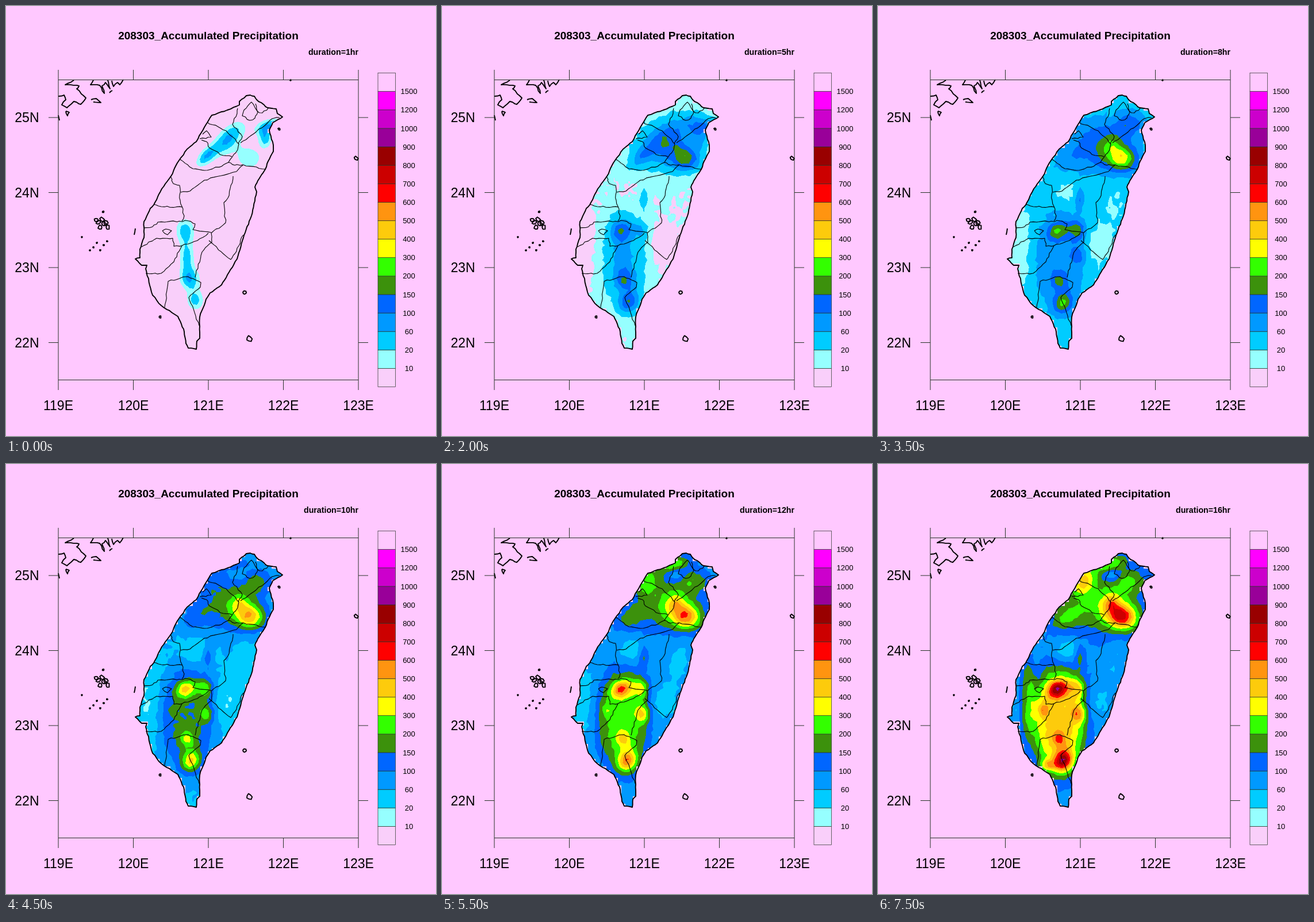
Recreate the animation shown at these times as an HTML page with a canvas. Size 748x748 px, loop 8000 ms.

```html
<!DOCTYPE html>
<html lang="en">
<head>
<meta charset="utf-8">
<title>Accumulated Precipitation</title>
<style>
  html, body { margin: 0; width: 100%; height: 100%; overflow: hidden; background: #ffc8ff; }
  canvas, svg { position: absolute; left: 0; top: 0; width: 748px; height: 748px; display: block; }
  text { font-family: "Liberation Sans", Arial, sans-serif; fill: #000; }
  .bold { font-weight: bold; }
  .axis { font-size: 23px; }
  .key { font-size: 13px; text-anchor: middle; }
  .frame { fill: none; stroke: #263426; stroke-width: 1; }
  .coast { fill: none; stroke: #000; stroke-width: 1.9; stroke-linejoin: round; }
  .border { fill: none; stroke: #000; stroke-width: 1.1; stroke-linejoin: round; }
</style>
</head>
<body>
<canvas id="rain" width="748" height="748"></canvas>
<svg id="map" viewBox="0 0 748 748">
  <text class="bold" x="352" y="58" font-size="19" text-anchor="middle">208303_Accumulated Precipitation</text>
  <text class="bold" id="duration" x="613" y="85" font-size="14.2" text-anchor="end">duration=1hr</text>
</svg>
<script>
const svg = document.getElementById('map');
const label = document.getElementById('duration');
const ctx = document.getElementById('rain').getContext('2d');

const COLORS = ['#f9cffa', '#96ffff', '#00ccff', '#0099ff', '#0066ff', '#3c910c', '#33ff00', '#ffff00',
  '#fdcb0c', '#ff9410', '#ff0000', '#cc0000', '#990000', '#990099', '#cc00cc', '#ff00ff', '#ffc8ff'];
const LIMITS = [10, 20, 60, 100, 150, 200, 300, 400, 500, 600, 700, 800, 900, 1000, 1200, 1500];

let seed = 7;
function random() {
  seed = (seed * 1664525 + 1013904223) % 4294967296;
  return seed / 4294967296;
}
const jitter = size => (random() * 2 - 1) * size;

function add(tag, attrs, text) {
  const el = document.createElementNS('http://www.w3.org/2000/svg', tag);
  for (const name in attrs) el.setAttribute(name, attrs[name]);
  if (text !== undefined) el.textContent = text;
  svg.appendChild(el);
}
const stroke = (kind, d) => add('path', { class: kind, d });

// Joins key points with a naturally ragged line
function ragged(keys, size) {
  const points = keys.split(' ').map(p => p.split(',').map(Number));
  let d = 'M' + points[0];
  for (let i = 1; i < points.length; i++) {
    const [ax, ay] = points[i - 1], [bx, by] = points[i];
    const parts = Math.ceil(Math.hypot(bx - ax, by - ay) / 6);
    for (let k = 1; k < parts; k++) {
      d += `L${ax + (bx - ax) * k / parts + jitter(size)} ${ay + (by - ay) * k / parts + jitter(size)}`;
    }
    d += 'L' + points[i];
  }
  return d;
}

const coast = ragged('425,155 432,157 436,163 449,172 455,177 470,179 472,187 481,193 464,203 458,216 '
  + '465,242 465,253 456,270 451,284 438,304 433,315 436,323 427,365 414,399 402,440 388,463 375,485 '
  + '355,499 348,510 337,541 337,578 332,583 331,597 317,595 313,587 309,562 299,540 270,521 255,503 '
  + '243,457 245,451 236,451 225,440 233,438 233,423 240,403 240,375 251,352 257,346 271,318 287,296 '
  + '298,273 315,249 331,236 345,211 358,190 385,181 406,172 406,166 418,156 425,155', .6) + 'Z';
const island = new Path2D(coast);

const BORDERS = [
  '403,178 402,187 394,206 411,227 404,239',
  '427,167 414,181 411,191 424,199 433,195 438,184 427,167',
  '434,170 437,183 446,186 456,178',
  '476,194 463,196 450,208 408,238',
  '350,202 383,217 405,240 403,250 387,272 398,277',
  '342,223 349,217 357,228 337,231',
  '340,233 349,236 354,247 378,260 393,262',
  '303,267 325,283 345,286 375,279 387,272',
  '398,277 412,276 452,284',
  '304,324 320,322 345,303 401,288 412,277',
  '286,296 291,309 302,312 303,338 310,365 306,374',
  '257,345 270,349 307,350',
  '239,386 255,384 264,376 318,374 329,379 325,389 357,394',
  '395,296 386,334 379,342 382,377 357,395',
  '272,391 278,388 288,391 281,398 272,391',
  '236,419 262,404 290,404 292,418 306,417',
  '243,465 270,465 292,445 306,417 333,408 352,395',
  '357,395 358,411 341,428 329,472',
  '353,408 378,431 391,441 398,431 413,398',
  '276,524 282,479 312,471 325,474 339,481 338,489 318,507 336,556'
];
const MAINLAND = [
  '91,157 101,155 104,163 97,172 106,177 118,166 130,171 139,160 123,144 127,139 103,137 118,129',
  '152,129 147,137 163,138 171,152 167,139 173,133 181,144 177,129',
  '184,130 187,140 194,133 198,137 204,128',
  '148,163 157,161 165,168 152,167', '104,183 110,185 107,191 104,183', '180,151 185,147', '91,190 93,199',
  '225,387 223,398'
];

function islet(x, y, r) {
  let d = '';
  for (let i = 0; i < 7; i++) {
    const a = i / 7 * Math.PI * 2, q = r * (.6 + random() * .5);
    d += (i ? 'L' : 'M') + (x + q * Math.cos(a)) + ' ' + (y + q * Math.sin(a));
  }
  stroke('coast', d + 'Z');
}

// Rain systems: flattened ellipses added to a steady rise, in steps of the colour scale
const systems = [];
function system(x, y, rx, ry, tilt, amount, from, to, edge = 1) {
  systems.push({ x, y, rx, ry, cos: Math.cos(tilt), sin: Math.sin(tilt), amount, from, to, edge });
}
const shower = (x, y, rx, ry, tilt = 0) => system(x, y, rx, ry, tilt, 3.4, 8, 1);
const plateau = (x, y, rx, ry, amount, from, to) => system(x, y, rx, ry, 0, amount, from, to, 2);

// First showers, fading into the total
shower(387, 229, 36, 17, -.84);
shower(347, 262, 24, 12, -.8);
shower(459, 207, 24, 11, -.4);
shower(451, 230, 12, 17);
shower(311, 389, 19, 24);
shower(314, 437, 15, 30);
shower(320, 475, 20, 20);
shower(329, 512, 17, 20);

// Northern ranges
system(388, 240, 60, 48, -.4, 2.6, -1, 5);
system(440, 203, 25, 20, 0, 1.8, -1, 5);
system(424, 265, 26, 22, .3, 6.8, -7, 16);
system(405, 242, 14, 16, 0, 2.7, 3, 14);
system(325, 267, 28, 17, -.5, 2, 4, 14);
system(356, 203, 18, 24, .5, 4, 9, 14);
system(402, 174, 30, 12, -.3, 3, 9, 12);
system(405, 192, 14, 11, 0, -2, 6, 14);

// Drier valley, east side and western plain
system(328, 325, 26, 20, -.6, -1.7, 2, 16);
system(410, 345, 16, 45, .2, -.8, 4, 12);
system(385, 415, 22, 28, 0, -1, 1, 5);
system(245, 415, 20, 65, 0, -1, 1, 6);
plateau(259, 410, 15, 70, 2.3, 12, 16);

// Central and southern ranges
plateau(315, 445, 46, 100, 1.4, 1, 5);
plateau(313, 445, 49, 92, 3, 8, 16);
system(351, 335, 8, 19, 0, 2, 1, 5);
system(312, 391, 17, 13, -.6, 5.9, 2, 14);
system(346, 389, 14, 18, 0, 2.7, 2, 8);
system(348, 434, 11, 14, 0, 3.2, 4, 12);
system(287, 427, 9, 13, 0, 2.3, 8, 16);
system(314, 477, 12, 13, 0, 2.6, 0, 10);
system(322, 516, 15, 18, .3, 6.5, 1, 16);
system(295, 523, 12, 9, 0, 3.5, 12, 16);

const clamp = (v, lo, hi) => Math.max(lo, Math.min(hi, v));

function levelAt(x, y, hour) {
  let level = 5.2 * Math.sin(hour / 16 * Math.PI / 2) - 1.4;
  for (const s of systems) {
    const dx = x - s.x, dy = y - s.y;
    const u = (dx * s.cos + dy * s.sin) / s.rx, v = (dy * s.cos - dx * s.sin) / s.ry;
    const grown = clamp((hour - s.from) / (s.to - s.from), 0, 1);
    level += s.amount * grown * Math.exp(-((u * u + v * v) ** s.edge));
  }
  return level;
}

const CELL = 6.5, LEFT = 221, TOP = 149, COLS = 41, ROWS = 70;
const RGB = COLORS.map(c => [1, 3, 5].map(i => parseInt(c.slice(i, i + 2), 16)));
const eachNode = fn => Array.from({ length: (COLS + 1) * (ROWS + 1) },
  (_, i) => fn(LEFT + i % (COLS + 1) * CELL, TOP + Math.floor(i / (COLS + 1)) * CELL, i));
const grain = eachNode(() => jitter(.22));
// Cells centred offshore stay empty, giving the stepped edge
const onLand = eachNode((x, y) => ctx.isPointInPath(island, x + CELL / 2, y + CELL / 2));

function paintRain(hour) {
  const layer = document.createElement('canvas');
  layer.width = Math.floor(COLS * CELL);
  layer.height = Math.floor(ROWS * CELL);
  const pen = layer.getContext('2d');
  const image = pen.createImageData(layer.width, layer.height);
  const grid = eachNode((x, y, i) => levelAt(x, y, hour) + grain[i] * Math.min(1, hour / 5));
  for (let y = 0; y < layer.height; y++) for (let x = 0; x < layer.width; x++) {
    const c = Math.floor(x / CELL), r = Math.floor(y / CELL);
    const i = r * (COLS + 1) + c, j = i + COLS + 1;
    if (!onLand[i]) continue;
    const u = x / CELL - c, v = y / CELL - r;
    const level = (grid[i] * (1 - u) + grid[i + 1] * u) * (1 - v) + (grid[j] * (1 - u) + grid[j + 1] * u) * v;
    image.data.set([...RGB[clamp(Math.floor(level), 0, 16)], 255], (y * layer.width + x) * 4);
  }
  pen.putImageData(image, 0, 0);
  return layer;
}

function drawChart() {
  for (const keys of BORDERS) stroke('border', ragged(keys, 1.2));
  stroke('coast', coast);
  for (const keys of MAINLAND) stroke('coast', ragged(keys, .8));
  for (let i = 0; i < 7; i++) islet(157 + i * 3.3, 378 + jitter(7), 4);
  for (let i = 0; i < 6; i++) islet(146 + i * 6, 426 - i % 3 * 9 + jitter(4), 1.2);
  islet(169, 358, 1.5);
  islet(132, 402, 1);
  islet(268, 541, 2);
  islet(415, 499, 3.5);
  islet(423, 579, 6);
  islet(475, 214, 2);
  islet(609, 265, 3.5);
  islet(495, 129, 1);

  add('rect', { class: 'frame', x: 91, y: 128.5, width: 522, height: 522 });
  for (let i = 0; i < 5; i++) {
    const x = 91 + i * 130.5;
    stroke('frame', `M${x} 111V128M${x} 651V668`);
    add('text', { class: 'axis', x, y: 703, 'text-anchor': 'middle' }, 119 + i + 'E');
  }
  for (let i = 0; i < 4; i++) {
    const y = 194 + i * 130.5;
    stroke('frame', `M74 ${y}H91M613 ${y}H630`);
    add('text', { class: 'axis', x: 57.5, y: y + 8, 'text-anchor': 'end' }, 25 - i + 'N');
  }
  const step = 546 / 17;
  COLORS.forEach((fill, i) => {
    const y = 662.5 - (i + 1) * step;
    add('rect', { x: 647, y, width: 30.5, height: step, fill, stroke: '#263426', 'stroke-width': .7 });
    if (i < LIMITS.length) add('text', { class: 'key', x: 701, y: y + 4.7 }, LIMITS[i]);
  });
}

drawChart();
const layers = Array.from({ length: 16 }, (_, i) => paintRain(i + 1));
let shown = 0;

function show(hour) {
  shown = hour;
  label.textContent = `duration=${hour}hr`;
  ctx.clearRect(0, 0, 748, 748);
  ctx.save();
  ctx.clip(island);
  ctx.fillStyle = COLORS[0];
  ctx.fillRect(0, 0, 748, 748);
  ctx.drawImage(layers[hour - 1], LEFT, TOP);
  ctx.restore();
}

let start;
function tick(now) {
  if (start === undefined) start = now;
  const hour = Math.floor((now - start) % 8000 / 500) + 1;
  if (hour !== shown) show(hour);
  requestAnimationFrame(tick);
}
show(1);
requestAnimationFrame(tick);
</script>
</body>
</html>
```
